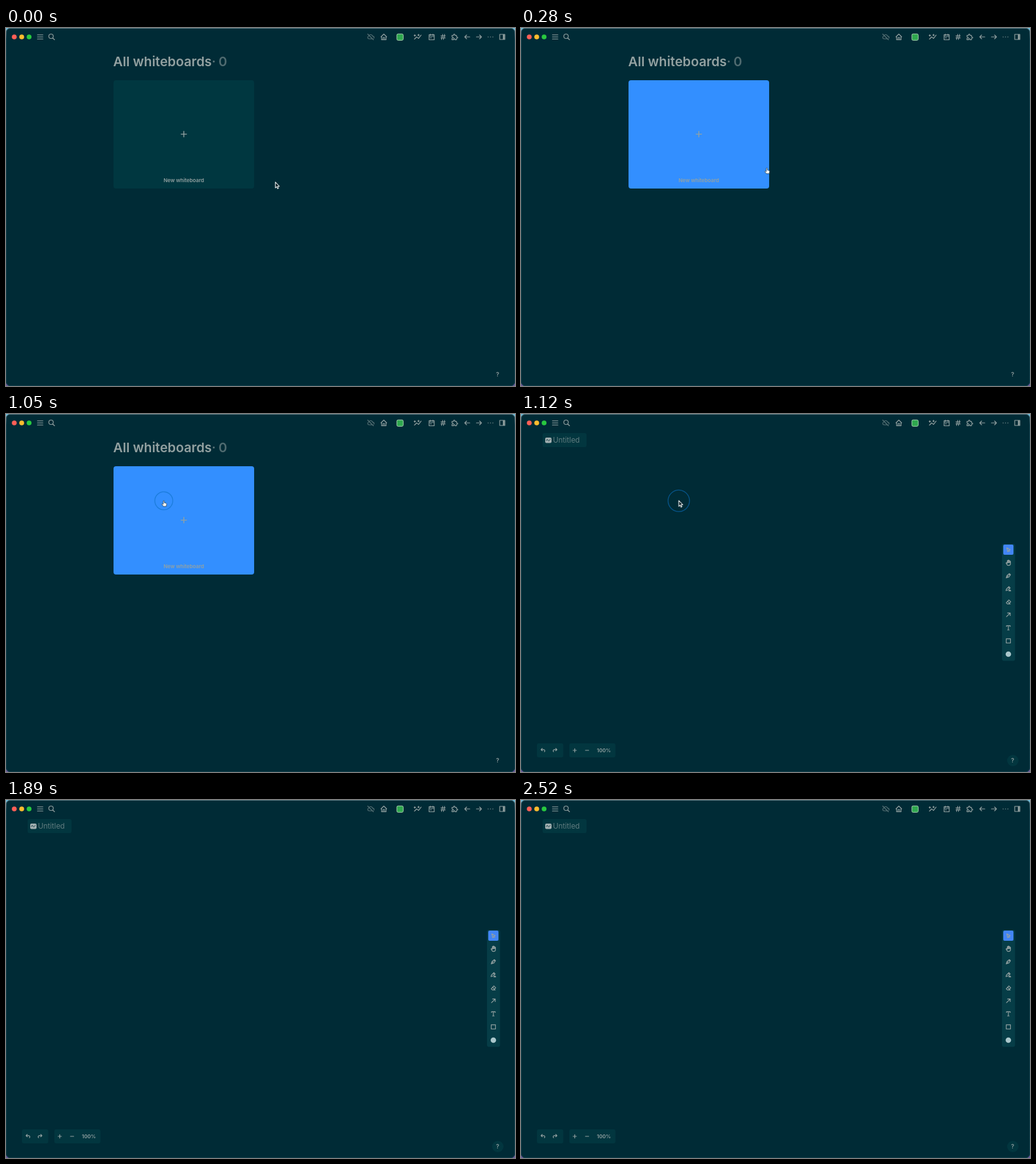
Recreate the animation shown at these times as an HTML page. Size 800 by 562 pixels, loop 2.59 s.

```html
<!DOCTYPE html>
<html lang="en">
<head>
<meta charset="utf-8">
<title>New whiteboard</title>
<style>
html, body { margin: 0; width: 100%; height: 100%; overflow: hidden; background: #002b36; }
svg { display: block; width: 100vw; height: 100vh; }
text { font-family: Inter, "Liberation Sans", sans-serif; font-weight: 600; fill: #93a1a1; }
.icon { fill: none; stroke: #93a1a1; stroke-linecap: round; stroke-linejoin: round; }
.panel { fill: #02363f; }
</style>
</head>
<body>
<svg viewBox="0 0 800 562">
  <defs>
    <linearGradient id="desk" x2="0" y2="1">
      <stop offset="0" stop-color="#72bfdc"/>
      <stop offset=".5" stop-color="#2d5c70"/>
      <stop offset="1" stop-color="#6d5c9c"/>
    </linearGradient>
    <linearGradient id="rim" x2="0" y2="1">
      <stop offset="0" stop-color="#5b7983"/>
      <stop offset=".03" stop-color="#164451"/>
      <stop offset="1" stop-color="#123e4a"/>
    </linearGradient>
  </defs>
  <rect width="800" height="562" fill="url(#desk)"/>
  <rect x=".5" y=".5" width="799" height="561" rx="5.5" fill="#002b36" stroke="url(#rim)"/>

  <circle cx="13" cy="14" r="3.8" fill="#ff5f57"/>
  <circle cx="24.7" cy="14" r="3.8" fill="#febc2e"/>
  <circle cx="36.3" cy="14" r="3.8" fill="#28c840"/>
  <rect x="614.3" y="9.3" width="10" height="10" rx="2" fill="#2fa84f" stroke="#a5cfae"/>
  <g id="bar"></g>

  <g id="list">
    <text x="168.6" y="60" font-size="20.6">All whiteboards</text>
    <text x="323.2" y="60" font-size="20.6" opacity=".6">·</text>
    <text x="334" y="60" font-size="20.6" opacity=".55">0</text>
    <rect id="card" x="169" y="82" width="221" height="170" rx="4"/>
    <path class="icon" d="M279.5 162.3v8.6M275.2 166.6h8.6" stroke-width="1.4"/>
    <text x="279.5" y="241.6" font-size="8.05" text-anchor="middle">New whiteboard</text>
  </g>

  <g id="board">
    <rect class="panel" x="34" y="30" width="69" height="22" rx="3"/>
    <rect x="38" y="37" width="10" height="8.4" rx="2" fill="#a3b0b1"/>
    <path d="M40 42.3c0-3 2-3 2.4-1.300s2 2 3.600-1.500" fill="none" stroke="#173f49"/>
    <text x="50.2" y="45" font-size="11.5" font-weight="400" style="font-weight:400" opacity=".65">Untitled</text>
    <rect class="panel" x="25" y="517" width="41.500" height="22" rx="3"/>
    <rect class="panel" x="76" y="517" width="72.500" height="22" rx="3"/>
    <text x="119.3" y="531.3" font-size="8">100%</text>
    <circle class="panel" cx="773" cy="544" r="9"/>
    <rect x="756" y="204" width="20.500" height="183.500" rx="3" fill="#063d47"/>
    <rect x="758" y="205" width="16" height="16" rx="2" fill="#4285f4"/>
    <circle cx="766" cy="377" r="4.300" fill="#a9c6cb"/>
    <g id="tools"></g>
  </g>

  <text x="772.7" y="547.4" font-size="9" text-anchor="middle">?</text>

  <circle id="ring" cx="248" cy="136.300" fill="none" stroke="#0b70c2" stroke-width="1.300"/>
  <g id="cursor">
    <path id="arrow" d="M0 0V9.200L2.100 7.300 3.500 10.400 5 9.700 3.600 6.700H6.400Z" fill="#12242a" stroke="#e4e8e8" stroke-width="1.050" stroke-linejoin="round"/>
    <path id="hand" d="M-.9.800Q0-.3.900.800V3.600L3.200 4Q4.600 4.400 4.500 5.800L3.800 9.300H-.5L-3.300 5.800Q-3.200 4.500-.9 5.900Z" fill="#f2f4f4" stroke="#25435c" stroke-width=".8" stroke-linejoin="round"/>
  </g>
</svg>
<script>
const LOOP = 2590, STEP = 70;
const $ = id => document.getElementById(id);
const clamp = v => Math.min(1, Math.max(0, v));
const easeInOut = p => p < .5 ? 4 * p ** 3 : 1 - 4 * (1 - p) ** 3;

// Icons are drawn on a 24-unit grid: x, y, size, path, opacity
const barIcons = [
  [53.7, 14, 13, "M4 6h16M4 12h16M4 18h16"],
  [71.8, 14, 12, "M3 10a7 7 0 1 0 14 0a7 7 0 1 0-14 0M21 21l-6-6"],
  [573, 14, 12, "M9.6 5.6c3-1.300 8-.2 9 4.800h1a3.400 3.400 0 0 1 2.400 5.900M18 18H6.700A4.600 4.600 0 0 1 7 9M3 3l18 18", .6],
  [593.8, 14, 12, "M5 12H3l9-9 9 9h-2M5 12v9h14v-9M9.500 21v-7h5v7"],
  [647.2, 14, 14, "M3 18l6-6 5 4 7-9M4 6v4M2 8h4M14 5v4M12 7h4"],
  [669, 14, 12, "M4 5h16v16H4zM16 3v4M8 3v4M4 10h16M8 15h3"],
  [687, 14, 12, "M5 9h14M5 15h14M11 4L7 20M17 4l-4 16"],
  [705.5, 14, 12, "M4 7h4V5a2 2 0 0 1 4 0v2h5v5h2a2 2 0 0 1 0 4h-2v5h-5v-2a2 2 0 0 0-4 0v2H3v-5h2a2 2 0 0 0 0-4H3V7z"],
  [725, 14, 12, "M4 12h16M4 12l6 6M4 12l6-6"],
  [743.3, 14, 12, "M4 12h16M20 12l-6 6M20 12l-6-6"],
  [761.5, 14, 12, "M4 12h1M11.500 12h1M19 12h1"],
  [780, 14, 12, "M4 4h16v16H4zM15 4v16M17.500 5v14"]
];

const toolPaths = [
  "M6 5l4 15 3-5 6-3zM13 14l4 5",
  "M8 13V5.500a1.500 1.500 0 0 1 3 0V12M11 5v-1.500a1.500 1.500 0 0 1 3 0V12M14 5.500a1.500 1.500 0 0 1 3 0V12M17 7.500a1.500 1.500 0 0 1 3 0V16a6 6 0 0 1-6 6h-2c-3 0-4-1-5.300-3L3.700 14a1.500 1.500 0 0 1 2.600-1.600L8 14",
  "M4 20l3-9 9-7 4 4-6 9zM4 20l8-8M14 6l4 5",
  "M3 19l2-6L14 4l5 5-9 8zM12 7l4 4M14 20l3-4 4 4z",
  "M19 20H8l-4-4 10-11 7 7-8 8M9 10l7 7",
  "M5 19L18 6M9 5h10v10",
  "M5 7V4h14v3M12 4v16M9 20h6",
  "M4 4h16v16H4z"
];
const tools = toolPaths.map((d, i) => [766, 213 + i * 20.45, 10, d]);
tools.push(
  [34.5, 528, 9, "M9 14L4 9l5-5M4 9h11a5 5 0 0 1 3 9"],
  [53.5, 528, 9, "M15 14l5-5-5-5M20 9H9a5 5 0 0 0-3 9"],
  [84.5, 528, 9, "M12 5v14M5 12h14"],
  [103.8, 528, 9, "M5 12h14"]
);

function drawIcons(parent, list) {
  parent.innerHTML = list.map(([x, y, size, d, alpha = 1]) => {
    const k = size / 24;
    return `<path class="icon" d="${d}" opacity="${alpha}" stroke-width="${1.15 / k}"
      transform="translate(${x} ${y}) scale(${k}) translate(-12 -12)"/>`;
  }).join("");
}

function show(id, on) {
  $(id).style.display = on ? "" : "none";
}

function render(now) {
  const t = Math.floor(now % LOOP / STEP) * STEP;
  const move = easeInOut(clamp((t - 70) / 560));
  const x = 423.3 - 175.3 * move, y = 241.8 - 106 * move;
  const opened = t >= 1120;
  const hover = x < 391;

  show("list", !opened);
  show("board", opened);
  $("card").setAttribute("fill", hover ? "#338fff" : "#003740");

  show("arrow", !hover || opened);
  show("hand", hover && !opened);
  $("cursor").setAttribute("transform", `translate(${x} ${y})`);
  $("cursor").setAttribute("opacity", 1 - clamp((t - 1400) / 420));

  // Click ripple: grows quickly, then fades
  const grow = clamp((t - 910) / 350);
  $("ring").setAttribute("r", 18 * (1 - (1 - grow) ** 3));
  $("ring").setAttribute("opacity", t > 910 ? .6 * (1 - clamp((t - 1120) / 210)) : 0);
}

function tick() {
  render(performance.now());
  requestAnimationFrame(tick);
}

drawIcons($("bar"), barIcons);
drawIcons($("tools"), tools);
tick();
</script>
</body>
</html>
```
